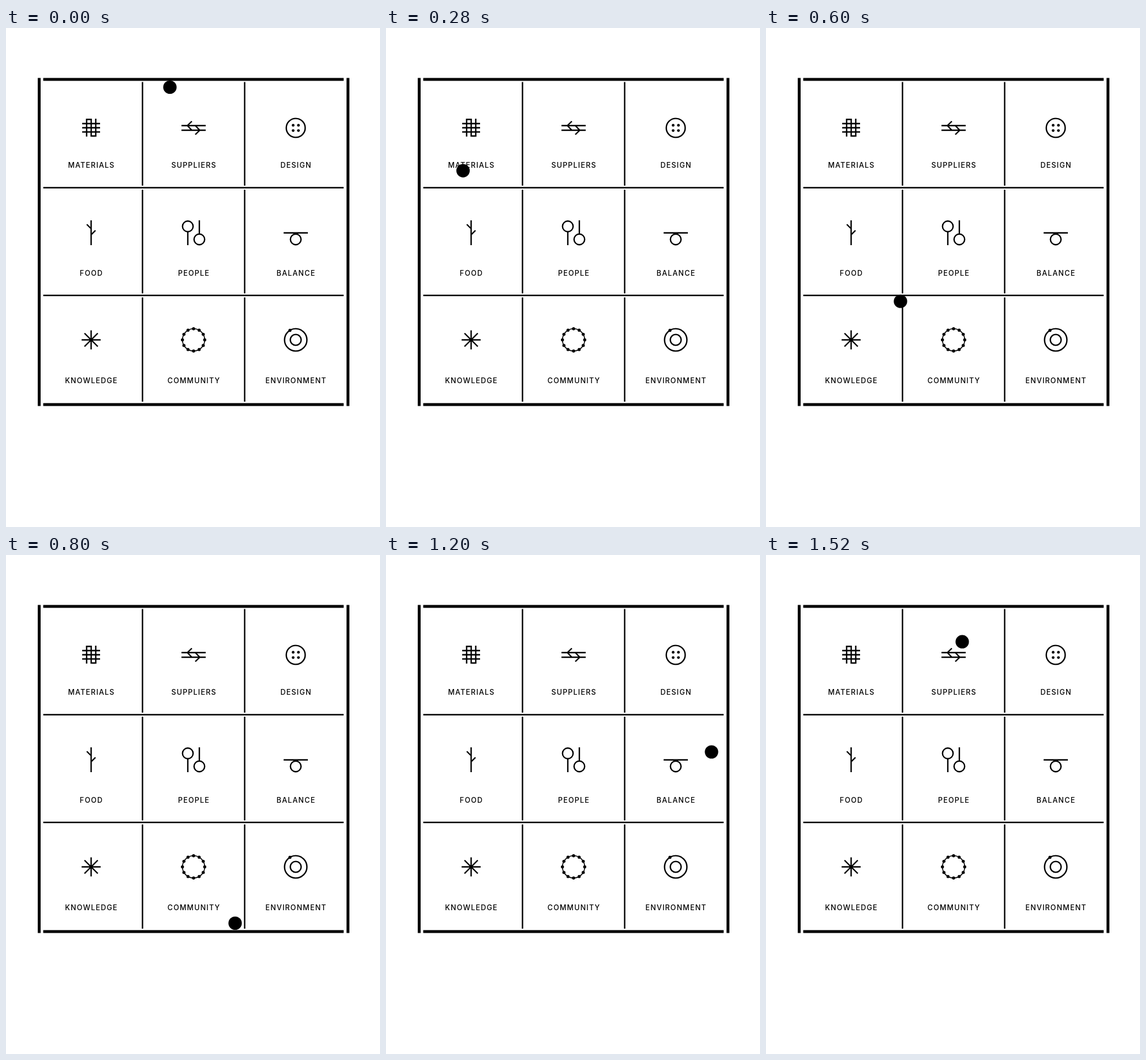
Recreate the animation shown at these times as an HTML page. Size 648 by 864 pixels, loop 1.56 s.

```html
<!DOCTYPE html>
<html lang="en">
<head>
<meta charset="utf-8">
<title>Bouncing dot grid</title>
<style>
  html, body { margin: 0; width: 100%; height: 100%; overflow: hidden; background: #fff; }
  svg { display: block; width: 648px; height: 864px; }
  .line { fill: none; stroke: #000; stroke-width: 2.4; }
  text { font: 500 12.5px Inter, Arial, sans-serif; letter-spacing: 1.2px; text-anchor: middle; }
</style>
</head>
<body>
<svg viewBox="0 0 648 864">
  <!-- frame and grid -->
  <path class="line" style="stroke-width:5" d="M57.5 86.5V654.5M592.5 86.5V654.5M64.5 89H585M64.5 652H585"/>
  <path class="line" d="M64.5 276.5H585M64.5 463H585
    M236.5 93.5V273M236.5 280V459.5M236.5 466.5V647
    M413.5 93.5V273M413.5 280V459.5M413.5 466.5V647"/>

  <!-- icons -->
  <g class="line">
    <path d="M132 165.5H163M132 172.7H163M132 180H163M139.7 188V158.3H147.6V187H155.5V157"/>
    <path d="M304 169H346M304 177H346M322 161.5L314.3 169L322 177M328 169L335.7 177L328 184.5"/>
    <circle cx="502" cy="173" r="16.4"/>
    <path d="M147.5 333V376M140 340L147.5 347.5M155 350.5L147.5 358"/>
    <path d="M315 353V376M335 333V357"/>
    <circle cx="315" cy="343.5" r="9.2"/>
    <circle cx="335" cy="366" r="9.2"/>
    <path d="M481 354.7H523"/>
    <circle cx="502" cy="366" r="9.2"/>
    <path d="M147.5 523.5V556.5M131 540H164M136 528.5L159 551.5M159 528.5L136 551.5"/>
    <circle cx="325" cy="540" r="19.3" stroke-width="1.6" style="stroke-width:1.6"/>
    <circle cx="502" cy="540" r="19.4"/>
    <circle cx="502" cy="540" r="9.4"/>
  </g>
  <g id="dots"></g>
  <g id="labels"></g>
  <circle id="ball" r="11.6"/>
</svg>
<script>
const STEP = 40, LOOP = 1560, LEG = 400;
const corners = [[284, 102.5], [69, 309], [397, 637.5], [564, 341], [284, 102.5]];
const bulge = [0, 0, 8, 0];  // sideways bow of each leg
const names = ["MATERIALS", "SUPPLIERS", "DESIGN", "FOOD", "PEOPLE", "BALANCE",
  "KNOWLEDGE", "COMMUNITY", "ENVIRONMENT"];
const columns = [148, 325.6, 502.6], baselines = [242, 428.5, 614.5];
const byId = id => document.getElementById(id);

function add(parent, tag, attributes, content = "") {
  const node = document.createElementNS("http://www.w3.org/2000/svg", tag);
  for (const key in attributes) node.setAttribute(key, attributes[key]);
  node.textContent = content;
  byId(parent).append(node);
}
const dot = (cx, cy, r) => add("dots", "circle", { cx, cy, r });

names.forEach((name, i) =>
  add("labels", "text", { x: columns[i % 3], y: baselines[Math.floor(i / 3)] }, name));

for (const x of [497.5, 506.7])
  for (const y of [168.4, 177.6]) dot(x, y, 2.4);
for (let i = 0; i < 12; i++) {
  const angle = i * Math.PI / 6;
  dot(325 + 19.3 * Math.cos(angle), 540 + 19.3 * Math.sin(angle), 2.7);
}
dot(492, 523.5, 2.7);

function draw() {
  const time = Math.floor(performance.now() % LOOP / STEP) * STEP;
  const leg = Math.floor(time / LEG), s = time % LEG / LEG;
  const [x0, y0] = corners[leg], [x1, y1] = corners[leg + 1];
  const ball = byId("ball");
  ball.setAttribute("cx", x0 + (x1 - x0) * s + 3 * s * s * (1 - s) * bulge[leg]);
  ball.setAttribute("cy", y0 + (y1 - y0) * s);
  requestAnimationFrame(draw);
}
draw();
</script>
</body>
</html>
```
